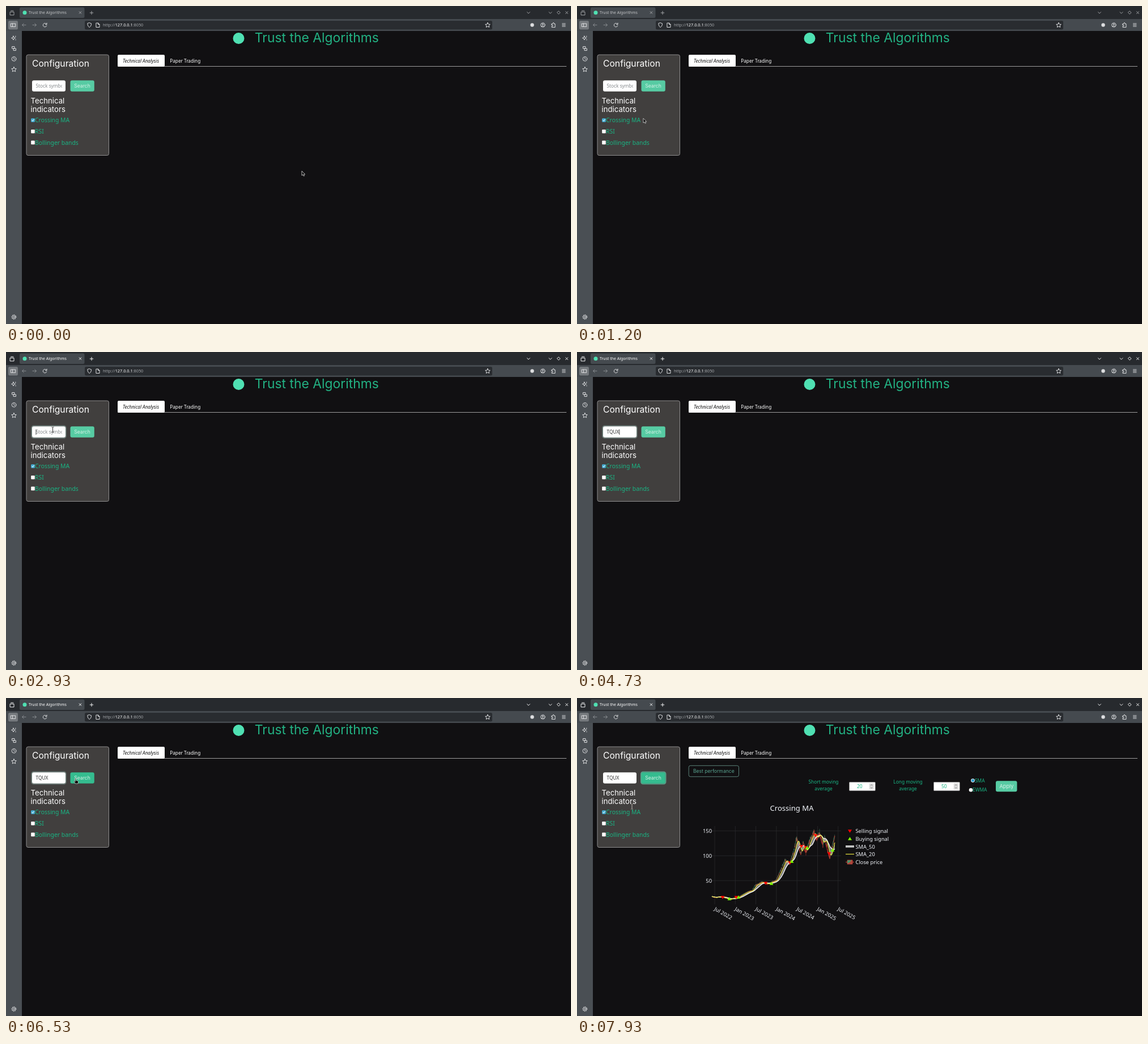
An HTML page that plays this animation: 997x561 px, repeating every 8000 ms.

```html
<!DOCTYPE html>
<html lang="en">
<head>
<meta charset="utf-8">
<title>Trust the Algorithms</title>
<style>
  html, body { margin: 0; width: 100%; height: 100%; overflow: hidden; background: #111012; }
  svg { display: block; width: 100vw; height: 100vh; font-family: "Noto Sans", sans-serif; }
  .head, .btn { font-family: Inter, sans-serif; }
  .btn { font-size: 8.6px; fill: #d6f2e7; text-anchor: middle; }
  .head { font-weight: 400; fill: #fff; }
  .icon { fill: none; stroke: #dcdddf; stroke-width: 1; stroke-linecap: round; stroke-linejoin: round; }
  .window { fill: none; stroke: #a2a4a7; stroke-width: 1; stroke-linecap: round; stroke-linejoin: round; }
  .caption { font-size: 6.95px; fill: #c3c5c7; }
  .active .window { stroke: #f4f4f5; }
  .active .caption { fill: #fff; }
  .green { fill: #19b584; }
  .check { font-size: 10.4px; }
  .label { font-size: 8.4px; }
  .mid { text-anchor: middle; }
  .chart { font-size: 9.3px; fill: #f2f5fa; }
</style>
</head>
<body>
<svg id="stage" viewBox="0 0 997 561" preserveAspectRatio="none">
  <rect width="997" height="561" fill="#111012"/>

  <!-- browser frame -->
  <rect width="997" height="23" fill="#272a2e"/>
  <rect y="23" width="997" height="21" fill="#454a4f"/>
  <rect y="44" width="28" height="517" fill="#4a4f54"/>
  <rect x="24" y="2.500" width="114.500" height="18.500" rx="2.500" fill="#454a4f"/>
  <rect x="139" y="26" width="719" height="15.500" rx="2.500" fill="#292c30"/>
  <rect x="4" y="26" width="17" height="15.500" rx="2.500" fill="#75797d"/>
  <circle cx="33" cy="11.700" r="3.500" fill="#4fe0b2"/>
  <text id="tabTitle" class="caption" x="40" y="14.200"></text>
  <g class="window">
    <path d="M7.500 10.500h6.500v5.500h-6.500zM8.500 8.300h4.500M129.200 9.800l3.600 3.600m0-3.600l-3.600 3.600M148.200 12h5.600M151 9.200v5.600M919.500 10.700l2.500 2.500 2.500-2.500M958 10.700l2.500 2.500 2.500-2.500M975.300 9l2.700 2.700-2.700 2.700-2.700-2.700zM987.500 9.700l4 4m0-4l-4 4"/>
  </g>
  <g class="icon">
    <path stroke="#85898d" d="M35 33.500h-6.500m2.800-2.800l-2.800 2.800 2.800 2.800M47 33.500h6.500m-2.800-2.800l2.800 2.800-2.800 2.800"/>
    <path d="M71.600 32.200a3.300 3.300 0 1 0 .2 2.400M72 30v2.400h-2.400"/>
    <path d="M147.200 29.700l3.300 1.200c0 3.300-1 5.300-3.300 6.700-2.300-1.400-3.300-3.400-3.300-6.700zM159.300 30h3.200l2.500 2.500v5h-5.700zM162.500 30v2.500h2.500"/>
    <path d="M8.700 31h8v5.500h-8zM11.500 31v5.500"/>
    <path id="star" d="M850 29.300l1.300 2.800 3 .3-2.200 2.100.6 3-2.700-1.500-2.700 1.500.6-3-2.200-2.100 3-.3z"/>
    <use href="#star" x="-836" y="78.300"/>
    <circle cx="947.300" cy="33.500" r="3.700"/>
    <circle cx="947.300" cy="32.300" r="1.100"/>
    <path d="M945 36q2.300-2.500 4.600 0M963 31.500h2v-1.200a1 1 0 0 1 2 0v1.200h2v6h-6v-2h1a1 1 0 0 0 0-2h-1zM981.500 31h5.500m-5.500 2.500h5.500m-5.500 2.500h5.500"/>
    <path d="M13 53l1 2.500 2.500 1-2.500 1-1 2.500-1-2.500-2.500-1 2.500-1zM16.800 53v1.500M17 59v1M11 71.500h4v3.500h-4zM13.500 75h4v3.500h-4z"/>
    <circle cx="14" cy="93.300" r="3.800"/>
    <path d="M14 91v2.500l1.500 1"/>
    <circle cx="14" cy="548.700" r="3.200"/>
    <circle cx="14" cy="548.700" r="1"/>
    <circle cx="14" cy="548.700" r="4" stroke-dasharray="1.200 1.942" stroke-linecap="butt"/>
  </g>
  <circle cx="928.500" cy="33.500" r="3.200" fill="#dcdddf"/>
  <text x="171" y="36.300" font-size="7.300" fill="#a5a8ab">http://<tspan fill="#fff">127.0.0.1</tspan>:8050</text>

  <!-- page -->
  <circle cx="410.500" cy="57" r="10" fill="#4fe0b2"/>
  <text class="head" x="438.800" y="64.300" style="font-size:22.9px;fill:#23b183">Trust the Algorithms</text>
  <path d="M197 106.500H989" stroke="#9c9c9c"/>
  <rect x="197" y="86" width="83" height="21" rx="2" fill="#fff"/>
  <text x="206" y="100" font-size="8.100" font-style="italic" fill="#111">Technical Analysis</text>
  <text x="289.300" y="100" font-size="8.200" fill="#fff">Paper Trading</text>

  <!-- configuration panel -->
  <rect x="36" y="86" width="145.500" height="177.500" rx="3" fill="#413f3e" stroke="#8f8e8e"/>
  <g class="head">
    <text x="46" y="107.200" font-size="15.700">Configuration</text>
    <text font-size="13.200"><tspan x="43.500" y="171.500">Technical</tspan><tspan x="43.500" y="186.500">indicators</tspan></text>
  </g>
  <rect id="inputRing" x="45.300" y="130.300" width="60.400" height="21.400" rx="3.500" fill="none" stroke="#6d7f7a" stroke-width="1.800"/>
  <rect x="46" y="131.300" width="59" height="19.400" rx="3" fill="#fff"/>
  <clipPath id="inputClip"><rect x="52" y="131" width="47" height="20"/></clipPath>
  <text id="entry" x="52.500" y="144.300" font-size="8.300" clip-path="url(#inputClip)"></text>
  <path id="caret" d="M.5 136.500v9.500" stroke="#222" stroke-width=".8"/>
  <rect id="buttonRing" x="113" y="130.500" width="43.500" height="21" rx="3.500" fill="none" stroke="#5b9c87" stroke-width="2"/>
  <rect id="button" x="113.500" y="131.200" width="42.300" height="19.600" rx="3"/>
  <text class="btn" x="134.500" y="144.200">Search</text>
  <g fill="#fff">
    <rect x="44.200" y="198.200" width="6.600" height="6.600" rx="1" fill="#45b0d8"/>
    <path d="M45.500 201.500l1.500 1.600 2.700-3.400" fill="none" stroke="#fff"/>
    <rect x="44.200" y="217.900" width="6.600" height="6.600" rx="1"/>
    <rect x="44.200" y="237.600" width="6.600" height="6.600" rx="1"/>
  </g>
  <g class="green check">
    <text x="51" y="205.300">Crossing MA</text>
    <text x="51" y="225">RSI</text>
    <text x="51" y="244.700">Bollinger bands</text>
  </g>

  <!-- search result -->
  <g id="controls">
    <rect x="197.200" y="119.300" width="88.300" height="19.500" rx="3" fill="none" stroke="#5a8279"/>
    <text class="btn" x="241.300" y="132.200" style="fill:#59a390">Best performance</text>
    <g class="green label">
      <g class="mid">
        <text x="435" y="151">Short moving</text><text x="435" y="163.200">average</text>
        <text x="584" y="151">Long moving</text><text x="584" y="163.200">average</text>
      </g>
      <text x="702" y="148.500">SMA</text>
      <text x="698" y="165.200">EWMA</text>
      <g id="spinner">
        <rect x="480.500" y="148.400" width="45.800" height="15.200" rx="1" fill="#fff" stroke="#8a8a8a" stroke-width=".8"/>
        <rect x="515.700" y="150.500" width="8" height="11" fill="#dcdcdc"/>
        <path d="M518 154.500l1.700-1.700 1.700 1.700m-3.400 3l1.700 1.700 1.700-1.700" fill="none" stroke="#666" stroke-width=".8"/>
      </g>
      <use href="#spinner" x="149"/>
      <text class="mid" x="498.700" y="159.200">20</text>
      <text class="mid" x="647.700" y="159.200">50</text>
    </g>
    <circle cx="698.500" cy="145.600" r="3.300" fill="#fff"/>
    <circle cx="698.500" cy="145.600" r="2.500" fill="#2d9fd0"/>
    <circle cx="695" cy="162.200" r="3.300" fill="#fff"/>
    <rect x="739" y="146.300" width="37.500" height="19" rx="3" fill="#57cba3"/>
    <text class="btn" x="758" y="159" style="font-size:9.2px">Apply</text>
  </g>
  <g id="chart" class="chart"></g>

  <!-- pointer shapes, hot spot at 0,0 -->
  <g id="pointer">
    <path id="arrow" d="M0 0v8l1.900-1.600 1.400 2.700 1.300-.7-1.300-2.500h2.400z" fill="#080808" stroke="#ddd" stroke-width=".8"/>
    <path id="beam" d="M-2-4.700q2 0 2 .9v7.600q0 .9-2 .9M2-4.700q-2 0-2 .9v7.600q0 .9 2 .9" fill="none" stroke-width=".8"/>
    <path id="hand" d="M-.8 0q.8-1 1.600 0v3.500l3 .8q1 .4.800 1.500l-.6 3.200h-4.500l-2.500-3.500q0-1.300 1.300-.7l.9.800z" fill="#080808" stroke="#ddd" stroke-width=".7"/>
  </g>
</svg>

<script>
const LOOP = 8000;
const $ = id => document.getElementById(id);
const show = (id, on) => $(id).setAttribute('visibility', on ? 'visible' : 'hidden');
const clamp = v => Math.max(0, Math.min(1, v));

// Linear interpolation through [key, value, ...] rows.
function sample(rows, key, column = 1) {
  let i = 1;
  while (i < rows.length - 1 && rows[i][0] < key) i++;
  const a = rows[i - 1], b = rows[i];
  return a[column] + (b[column] - a[column]) * clamp((key - a[0]) / (b[0] - a[0]));
}

function random(seed) {
  return () => (seed = (seed * 16807) % 2147483647) / 2147483647;
}

function buildChart() {
  const price = [
    [238, 18], [244, 15.5], [250, 18], [258, 16], [269, 12], [276, 15], [282, 15], [289, 20], [300, 27],
    [309, 30], [314, 40], [326, 47], [336, 43], [345, 48], [351, 50], [360, 72], [367, 92],
    [375, 84], [382, 106], [387, 135], [391, 124], [395, 101], [399, 126], [404, 106],
    [410, 128], [418, 147], [423, 135], [428, 146], [434, 120], [437, 136], [442, 112],
    [446, 95], [450, 116], [455, 140]
  ];
  const yOf = v => 366 - v * .877;
  const step = .29, next = random(42), days = [];
  for (let x = 238; x <= 455; x += step) {
    const base = sample(price, x);
    days.push({ x, close: base * (1 + (next() - .5) * .045), swing: base * (.01 + next() * .025) });
  }
  const average = n => days.map((d, i) => {
    const span = days.slice(Math.max(0, i - n + 1), i + 1);
    return `${d.x.toFixed(1)} ${yOf(span.reduce((s, e) => s + e.close, 0) / span.length).toFixed(1)}`;
  });
  const slow = average(50), fast = average(20);
  const candles = up => days.map((d, i) =>
    (i && d.close > days[i - 1].close) === up
      ? `M${d.x.toFixed(1)} ${yOf(d.close + d.swing).toFixed(1)}V${yOf(d.close - d.swing).toFixed(1)}` : '').join('');

  const line = (d, stroke, width) => `<path d="${d}" fill="none" stroke="${stroke}" stroke-width="${width}"/>`;
  const text = (x, y, s, extra = '') => `<text x="${x}" y="${y}" ${extra}>${s}</text>`;
  const triangle = (x, y, up) => {
    const h = up ? -2.7 : 2.7;
    return `<path d="M${x - 3.5} ${y - h}h7L${x} ${y + h}z" fill="${up ? '#7cfc00' : '#f00'}"/>`;
  };

  let out = text(379, 199, 'Crossing MA', 'class="mid" font-size="13.1"');
  ['Jul 2022', 'Jan 2023', 'Jul 2023', 'Jan 2024', 'Jul 2024', 'Jan 2025', 'Jul 2025'].forEach((label, i) => {
    const x = 243 + i * 36.3;
    out += line(`M${x} 226V364`, '#2a2a2c', .8);
    out += text(x - 1.5, 374, label, `transform="rotate(30 ${x - 1.5} 374)"`);
  });
  for (const v of [50, 100, 150]) {
    out += line(`M238 ${yOf(v)}H466`, '#2a2a2c', .8);
    out += text(238, yOf(v) + 3.5, v, 'text-anchor="end"');
  }
  out += line(candles(true), '#3d9970', .45) + line(candles(false), '#ff4136', .45);
  out += `<path d="M${slow.join('L')}L${[...fast].reverse().join('L')}z" fill="#ddd" opacity=".55"/>`;
  out += line('M' + slow.join('L'), '#fff', 1.3) + line('M' + fast.join('L'), '#f0ea40', 1.1);
  const sells = [[257, 352], [281, 352], [333, 327], [376, 291], [396, 262], [404, 264], [421, 243], [445, 275]];
  const buys = [[269, 354], [285, 351], [343, 327], [379, 288], [406, 264], [451, 268]];
  out += sells.map(p => triangle(...p, false)).join('') + buys.map(p => triangle(...p, true)).join('');

  out += triangle(481.5, 235, false) + triangle(481.5, 248, true);
  out += line('M474 262h15', '#eee', 3.4) + line('M474 262.500h15', '#888', .8) + line('M474 275.500h15', '#d9d43c', 1.3);
  out += line('M474 289.500h15', '#d8483c', .9);
  out += '<path d="M477 286h9l-9 7z" fill="#3d9970"/><path d="M486 286v7h-9z" fill="#a5473c"/>';
  out += line('M477 286h9v7h-9zM486 286l-9 7', '#e8463a', .7);
  ['Selling signal', 'Buying signal', 'SMA_50', 'SMA_20', 'Close price'].forEach((s, i) => {
    out += text(491.5, 238 + i * 13.75, s);
  });
  $('chart').innerHTML = out;
}

const pointerPath = [
  [0, 523, 291], [333, 190, 302], [600, 190, 302], [667, 184, 300.5], [1400, 92, 160], [1467, 92, 160],
  [1933, 82.5, 137], [5667, 82.5, 137], [6133, 108.5, 137.5], [6533, 123, 142],
  [6800, 123, 142], [7133, 97, 184], [7667, 97, 184], [7800, 97, 191.5]
];
const symbol = 'TQUX';
const keyTimes = [4200, 4400, 4667, 4733];
const FOCUS = 2600, HOVER = 6267, CLICK = 6600, RESULT = 7733;

function pointerKind(x, y) {
  const inside = (l, t, r, b) => x >= l && x <= r && y >= t && y <= b;
  if (inside(113.5, 131, 156, 151)) return 'hand';
  if (inside(46, 131, 105, 151) || inside(44, 160, 107, 210)) return 'beam';
  return 'arrow';
}

function draw(time) {
  const t = Math.floor(time * .015 + .06) / .015 + 1;
  const between = (a, b) => t >= a && t < b;

  $('stage').classList.toggle('active', t >= FOCUS);
  $('tabTitle').textContent = between(CLICK, RESULT) ? 'Updating...' : 'Trust the Algorithms';

  const typed = symbol.slice(0, keyTimes.filter(k => t >= k).length);
  const entry = $('entry');
  entry.textContent = typed || 'Stock symbol';
  entry.setAttribute('fill', typed ? '#333' : '#85898c');
  const caretX = 52.5 + (typed ? entry.getComputedTextLength() : 0);
  $('caret').setAttribute('transform', `translate(${caretX} 0)`);
  show('caret', between(FOCUS, 3933) || between(4200, 5733));
  $('inputRing').setAttribute('opacity', between(FOCUS, CLICK) ? clamp((t - FOCUS) / 150) : 0);

  const hover = clamp((t - HOVER) / 150);
  const mix = (a, b) => Math.round(a + (b - a) * hover);
  $('button').setAttribute('fill', `rgb(${mix(87, 53)},${mix(203, 188)},${mix(163, 143)})`);
  $('buttonRing').setAttribute('opacity', clamp((t - CLICK) / 150));

  show('controls', t >= RESULT);
  show('chart', t >= RESULT + 67);

  const x = sample(pointerPath, t), y = sample(pointerPath, t, 2);
  const kind = between(4200, 5733) ? '' : pointerKind(x, y);
  $('pointer').setAttribute('transform', `translate(${x} ${y})`);
  for (const id of ['arrow', 'beam', 'hand']) show(id, id === kind);
  $('beam').setAttribute('stroke', y < 152 ? '#222' : '#aaa5a0');
}

buildChart();
const start = performance.now();
function tick() {
  draw((performance.now() - start) % LOOP);
  requestAnimationFrame(tick);
}
tick();
</script>
</body>
</html>
```
